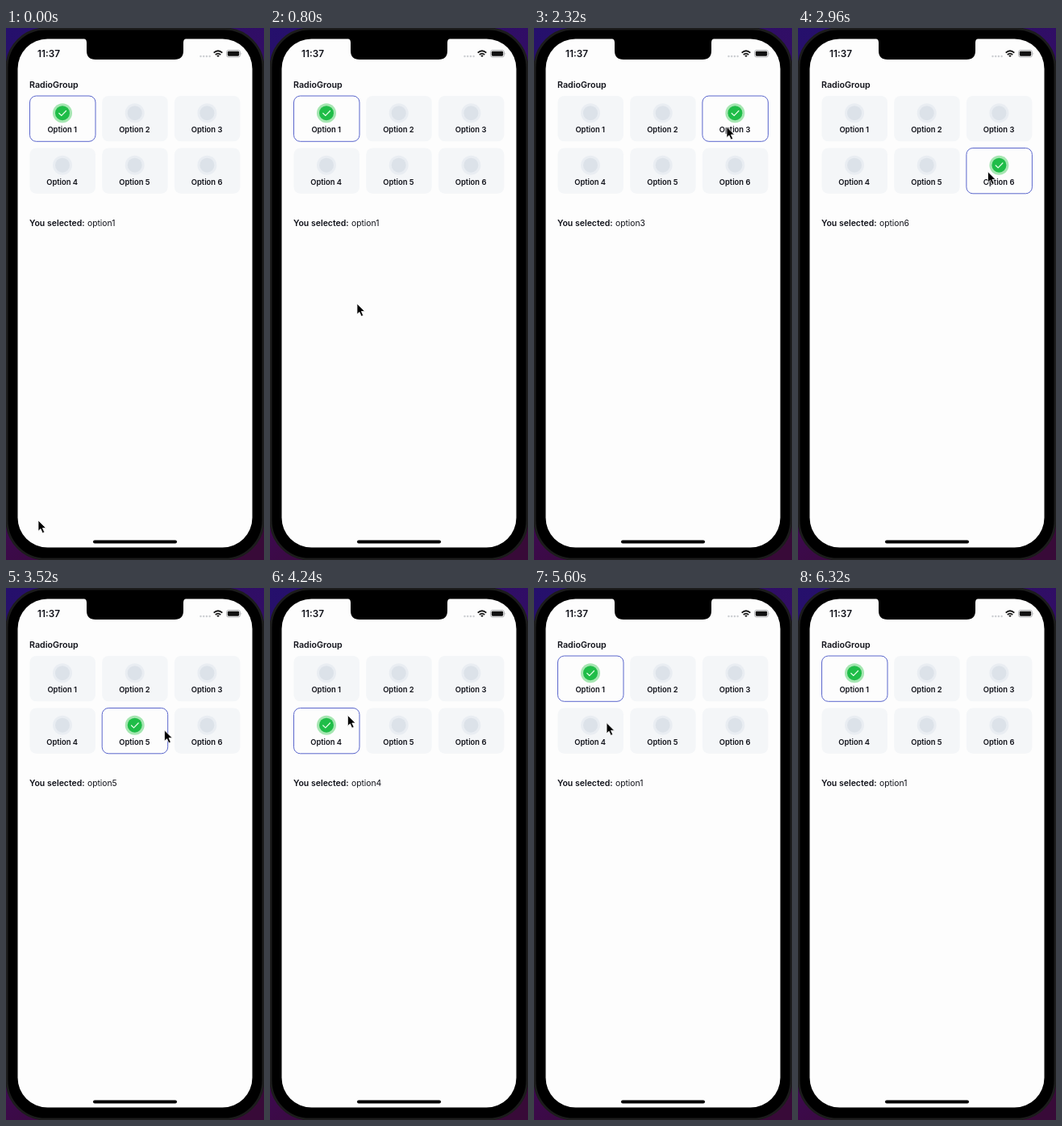
Animation of 320 by 658 pixels, one loop 6400 ms. Source, as an HTML page:

```html
<!DOCTYPE html>
<html lang="en">
<head>
<meta charset="utf-8">
<title>Radio group</title>
<style>
  html, body { margin: 0; width: 100%; height: 100%; overflow: hidden; background: #000; }
  svg { display: block; width: 320px; height: 658px; }
  text { font-family: Inter, "Liberation Sans", sans-serif; font-size: 10.5px; fill: #0f1018; }
  .bold { font-weight: 600; }
  .box { fill: #f4f6f8; }
  .halo { fill: #e9edf2; }
  .dot { fill: #dce2e9; }
  .tick { fill: none; stroke: #e6ffe8; stroke-width: 1.2; stroke-linecap: round; stroke-linejoin: round; visibility: hidden; }
  .label { font-size: 9.4px; font-weight: 600; text-anchor: middle; }
  .pressed .box { fill: #d5d6d9; }
  .pressed .halo, .pressed .dot { fill: #cbcdd1; }
  .on .box { fill: #fdfdfd; stroke: #5a66cc; }
  .on .halo { fill: #a6e6b2; }
  .on .dot { fill: #1fbd48; }
  .on .tick { visibility: visible; }
</style>
</head>
<body>
<svg viewBox="0 0 320 658">
  <defs>
    <linearGradient id="wall" x2="0.35" y2="1">
      <stop offset="0" stop-color="#25106c"/>
      <stop offset="0.75" stop-color="#400a5c"/>
      <stop offset="1" stop-color="#380a38"/>
    </linearGradient>
  </defs>
  <rect width="320" height="658" fill="url(#wall)"/>
  <rect x="1" y="1" width="318" height="656" rx="48" fill="#000" stroke="#1c1c1c" stroke-width="3"/>
  <rect x="14.5" y="13.5" width="291" height="629" rx="37" fill="#fdfdfd"/>
  <path d="M95 12.5Q100 13 100 18V28Q100 39 111 39H209Q220 39 220 28V18Q220 13 225 12.5Z"/>

  <text class="bold" x="39" y="36" style="font-size:11.8px">11:37</text>
  <g fill="none" stroke="#111" stroke-width="1.8">
    <path d="M241.5 35H253" stroke="#ccced2" stroke-width="2.4" stroke-linecap="round" stroke-dasharray="0 3.7"/>
    <path d="M257.7 30.6Q263 25.8 268.3 30.6M259.8 33Q263 30.2 266.2 33"/>
    <path d="M261.3 34.2Q263 32.8 264.7 34.2L263 36Z" fill="#111" stroke="none"/>
  </g>
  <rect x="273.5" y="27.5" width="17" height="8.5" rx="2.5" fill="none" stroke="#a4a5a9" stroke-width=".8"/>
  <rect x="274.8" y="28.8" width="14.4" height="5.9" rx="1.4" fill="#111"/>
  <path d="M291.6 30.2Q293 31.7 291.6 33.2Z" fill="#a4a5a9"/>

  <text class="bold" x="29" y="74" style="font-size:10.7px">RadioGroup</text>
  <g id="cards"></g>
  <text class="bold" x="29" y="245">You selected:</text>
  <text id="value" x="101" y="245" style="font-size:10.3px">option1</text>
  <rect x="108" y="633.5" width="104" height="4" rx="2"/>

  <circle id="touch" r="15.3" fill="#77787c" fill-opacity=".25" stroke="#6c6d70" stroke-opacity=".8"/>
  <path id="cursor" d="M0 0V13.2L3 10.5L5.3 15.7L7.7 14.6L5.4 9.6H9.6Z" stroke="#f6f6f6" stroke-width=".8"/>
</svg>
<script>
const LOOP = 6400, STEP = 80;
const FIRST = 1520, GAP = 600, PRESS = 160, GONE = 6320;
const $ = id => document.getElementById(id);

// taps in order, with the pointer tip for each
const taps = [
  { option: 2, x: 166, y: 112 }, { option: 3, x: 239, y: 121 },
  { option: 6, x: 239, y: 178 }, { option: 5, x: 199, y: 176 },
  { option: 4, x: 97, y: 177 }, { option: 1, x: 95, y: 112 }
];
const enter = { x: 40, y: 609 }, leave = { x: 45, y: 664 };

function card(i) {
  const x = 29.5 + (i % 3) * 89.7, y = 84 + Math.floor(i / 3) * 64.5;
  return `<g transform="translate(${x} ${y})">
    <rect class="box" width="81.5" height="56.3" rx="8"/>
    <circle class="halo" cx="40.5" cy="21.2" r="12"/>
    <circle class="dot" cx="40.5" cy="21.2" r="9"/>
    <path class="tick" d="M36.3 21.5L39.3 24.4L45 18.5"/>
    <text class="label" x="40.2" y="45.2">Option ${i + 1}</text>
  </g>`;
}
$("cards").innerHTML = taps.map((_, i) => card(i)).join("");
const cards = [...$("cards").children];

const clamp = u => Math.min(1, Math.max(0, u));
const smooth = u => u * u * (3 - 2 * u);
const mix = (a, b, e) => ({ x: a.x + (b.x - a.x) * e, y: a.y + (b.y - a.y) * e });

// n: index of the latest tap (-1 before any), since: time after it began
function pointerAt(t, n, since) {
  if (n < 0) return mix(enter, taps[0], smooth(t / FIRST));
  const wait = since - PRESS;
  if (n < taps.length - 1) return mix(taps[n], taps[n + 1], smooth(clamp(wait / (GAP - PRESS))));
  const start = FIRST + n * GAP + PRESS;
  return mix(taps[n], leave, clamp(wait / (GONE - start)) ** 4);
}

function draw(now) {
  const t = Math.floor((now % LOOP) / STEP) * STEP;
  const n = Math.min(taps.length - 1, Math.floor((t - FIRST) / GAP));
  const last = Math.max(-1, n), since = t - FIRST - last * GAP;
  const down = last >= 0 && since < PRESS;
  const chosen = taps[down ? last - 1 : last]?.option ?? 1;
  const { x, y } = pointerAt(t, last, since);

  cards.forEach((c, i) => {
    c.classList.toggle("on", chosen === i + 1);
    c.classList.toggle("pressed", down && taps[last].option === i + 1);
  });
  $("value").textContent = "option" + chosen;
  $("cursor").setAttribute("transform", `translate(${x} ${y})`);
  $("touch").setAttribute("transform", `translate(${x} ${y + 1})`);
  $("touch").style.visibility = down ? "visible" : "hidden";
}

const start = performance.now();
function tick() {
  draw(performance.now() - start);
  requestAnimationFrame(tick);
}
tick();
</script>
</body>
</html>
```
